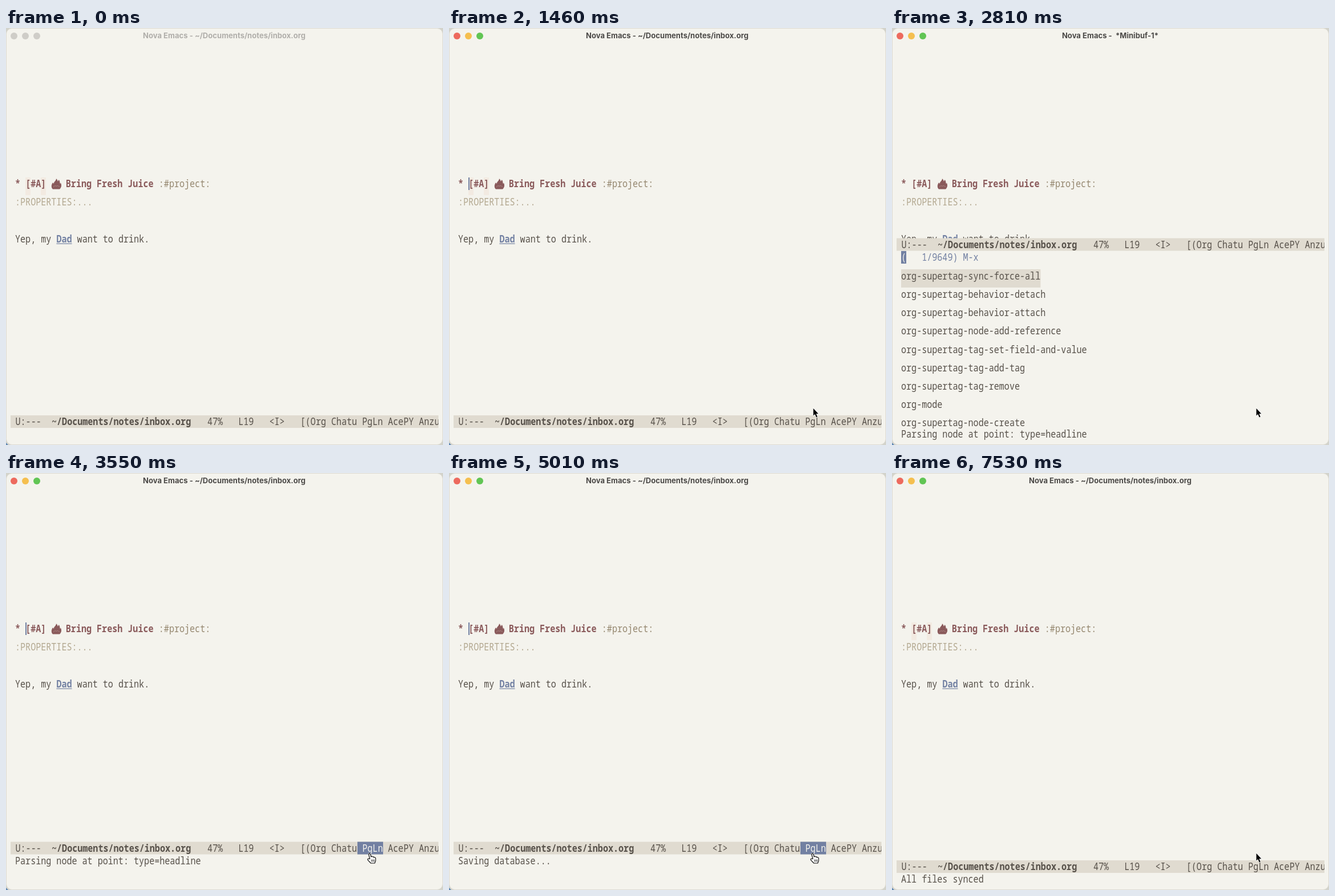
Recreate the animation shown at these times as an HTML page. Size 766 by 731 pixels, loop 8000 ms.

```html
<!DOCTYPE html>
<html lang="en">
<head>
<meta charset="utf-8">
<title>Nova Emacs</title>
<style>
  html, body { margin: 0; height: 100%; overflow: hidden; background: #d3d3cb; }
  svg { display: block; width: 766px; height: 731px; }
  text { white-space: pre; font: 500 18px "Noto Sans Mono", "DejaVu Sans Mono", monospace; fill: #57514a; }
  .b { font-weight: 700; }
  .red { fill: #8a5a5b; }
  .tag { fill: #95876f; }
  .dim { fill: #b3a890; }
  .blue { fill: #7280a2; }
  .pale { fill: #f4f3ed; }
  #title { font: 700 13px Inter, "Open Sans", sans-serif; letter-spacing: .04px; text-anchor: middle; }
</style>
</head>
<body>
<svg viewBox="0 0 766 731">
  <defs><clipPath id="inner"><rect x="8" y="28" width="750" height="694"/></clipPath></defs>
  <path d="M0 727L4 731H0Z" fill="#5d86b4"/>
  <rect x=".5" y=".5" width="765" height="730" rx="10" fill="#f4f3ed" stroke="#dcdad2"/>
  <g id="lights"></g>
  <text id="title" x="382.5" y="18.4"></text>
  <g clip-path="url(#inner)">
    <g id="parens" fill="#f2eae1">
      <rect x="34" y="262" width="9" height="31"/><rect x="61" y="262" width="9" height="31"/>
    </g>
    <g id="buffer"></g>
    <path class="red" d="M82 282.5C79 280 79 275 82 271L83.5 273C84 269 88 268 88 264Q90.5 266 91 269L92.5 266C95 269 94 271 95 273L96 271.5C98 276 97 280 94 282.5Z"/>
    <path d="M83 279Q86 275 88 277.5 91 275 94 279" fill="none" stroke="#b99a96" stroke-width=".7"/>
    <rect id="caret" class="blue" x="34" y="262" width="2" height="22"/>
    <g id="popup"></g>
    <g id="modeline"></g>
    <g id="echo"></g>
  </g>
  <path id="arrow" d="M.6 .8V13.6L3.5 11 5.8 16.4 7.8 15.5 5.5 10.2H9.4Z" stroke="#fff" stroke-width="1.2" paint-order="stroke"/>
  <g id="hand" transform="translate(633 666)" fill="#fff" stroke="#111" stroke-width="1.2" stroke-linejoin="round">
    <path d="M4.8 10.5L2.8 3Q2.6 1.3 4 1.2T6 3L7 7Q7.5 5.6 9 6T10.5 7.4Q12 6.6 12.8 8 14.7 7.6 14.9 9.5L14.8 14 13.3 18H6.5L1.2 12.3Q.6 10 2.5 10Z"/>
    <path d="M7.8 11.5V15.5M10 11.5V15.5M12.2 11.5V15.5" stroke-width=".9"/>
  </g>
</svg>
<script>
const CELL = 9.05, LEFT = 16, CONDENSE = CELL / 10.8;
const $ = id => document.getElementById(id);
const show = (id, on) => $(id).style.display = on ? '' : 'none';
const within = (t, ...spans) => spans.some(([a, b]) => t >= a && t < b);

// One run of condensed monospace text, centred vertically on y
const run = (x, y, str, cls = '') =>
  `<text class="${cls}" transform="translate(${x} ${y + 6}) scale(${CONDENSE} 1)">` +
  str.replace(/</g, '&lt;').replace(/>/g, '&gt;') + '</text>';
const box = (x, y, w, h, fill) =>
  `<rect x="${x}" y="${y}" width="${w}" height="${h}" fill="${fill}"/>`;
const col = n => LEFT + n * CELL;

$('buffer').innerHTML =
  run(LEFT, 273, '*', 'b red') + run(col(2), 273, '[#A]', 'b red') +
  run(104.8, 273, 'Bring Fresh Juice', 'b red') + run(267.8, 273, ':#project:', 'tag') +
  run(LEFT, 305, ':PROPERTIES:...', 'dim') +
  run(LEFT, 370, 'Yep, my') + run(col(8), 370, 'Dad', 'b blue') +
  box(col(8), 377.5, 3 * CELL, 1.2, '#7280a2') + run(col(12), 370, 'want to drink.');

const commands = ['supertag-sync-force-all', 'supertag-behavior-detach', 'supertag-behavior-attach',
  'supertag-node-add-reference', 'supertag-tag-set-field-and-value', 'supertag-tag-add-tag',
  'supertag-tag-remove', 'mode', 'supertag-node-create'];

$('popup').innerHTML =
  box(8, 369, 750, 353, '#f4f3ed') + box(LEFT, 423, 27 * CELL, 32, '#e0dbd0') +
  run(LEFT, 402, '(   1/9649) M-x', 'blue') +
  `<rect id="inputCaret" class="blue" x="${col(15)}" y="391" width="2" height="22"/>` +
  '<g id="block">' + box(LEFT, 391, 9, 22, '#7280a2') + run(LEFT, 402, '(', 'pale') + '</g>' +
  commands.map((c, i) => run(LEFT, 435 + i * 32.15, 'org-' + c)).join('');

$('modeline').innerHTML =
  box(8, -11, 750, 22, '#e0dbd0') + run(LEFT + .5, 0, 'U:---') +
  run(80, 0, '~/Documents/notes/inbox.org', 'b') +
  run(353, 0, '47%   L19   <I>   [(Org Chatu PgLn AcePY Anzu') +
  '<g id="hover">' + box(616, -11, 45, 22, '#7280a2') + run(353 + 30 * CELL, 0, 'PgLn', 'pale') + '</g>';

const PARSE = 'Parsing node at point: type=headline';
const SAVING = 'Saving database...', SAVED = 'Database saved successfully';
const LONG = PARSE + ', file=~/Documents/notes/inbox.org, line=19,\nlevel=1';
const messages = [[0, ''], [2810, PARSE], [2870, SAVED], [3550, PARSE], [3670, SAVING], [3730, SAVED],
  [4040, LONG], [4100, SAVED]];
for (const at of [4280, 4460, 4770, 5010, 5190, 5620, 5990])
  messages.push([at, SAVING], [at + 60, SAVED]);
messages.push([6110, 'All files synced']);

// Pointer stops: time, x, y
const stops = [[500, 453, 610], [680, 474, 670], [860, 474, 670], [1280, 638, 666]];
function pointerAt(t) {
  const i = stops.findIndex(s => s[0] > t);
  if (i < 1) return stops[i ? stops.length - 1 : 0].slice(1);
  const [a, x, y] = stops[i - 1], [b, x2, y2] = stops[i];
  const p = (t - a) / (b - a), e = p * p * (3 - 2 * p);
  return [x + (x2 - x) * e, y + (y2 - y) * e];
}

// Write markup only when it changes
const cache = {};
function put(id, html) {
  if (cache[id] !== html) $(id).innerHTML = cache[id] = html;
}

function draw(now) {
  const t = now % 8000;
  const active = t >= 1340, popup = within(t, [1520, 2870]), busy = within(t, [2870, 6110]);
  const colors = active ? ['#ed6a5e', '#f5bf4f', '#61c554'] : Array(3).fill('#cfcdc8');

  put('lights', colors.map((c, i) =>
    `<circle cx="${14 + 20 * i}" cy="14" r="6" fill="${c}"/>`).join(''));
  put('title', 'Nova Emacs - ' + (popup ? ' *Minibuf-1*' : '~/Documents/notes/inbox.org'));
  $('title').style.fill = active ? '#4b4947' : '#b0aeaa';

  show('parens', t < 1520 || t >= 6240);
  show('caret', within(t, [1340, 1520], [2870, 6540], [7100, 7530]));
  show('popup', popup);
  show('inputCaret', within(t, [1520, 2010], [2500, 2810]));
  show('block', t >= 2810);
  show('hover', busy);

  const bar = popup ? 379.5 : busy ? 657.5 : 690;
  $('modeline').setAttribute('transform', `translate(0 ${bar})`);
  const msg = messages.filter(m => m[0] <= t).pop()[1];
  put('echo', msg.split('\n').map((s, i) => run(LEFT, (busy ? 680 : 712) + 32 * i, s)).join(''));

  show('arrow', t >= 500 && !busy);
  show('hand', busy);
  $('arrow').setAttribute('transform', `translate(${pointerAt(t)})`);
}

function tick() {
  draw(performance.now());
  requestAnimationFrame(tick);
}
tick();
</script>
</body>
</html>
```
